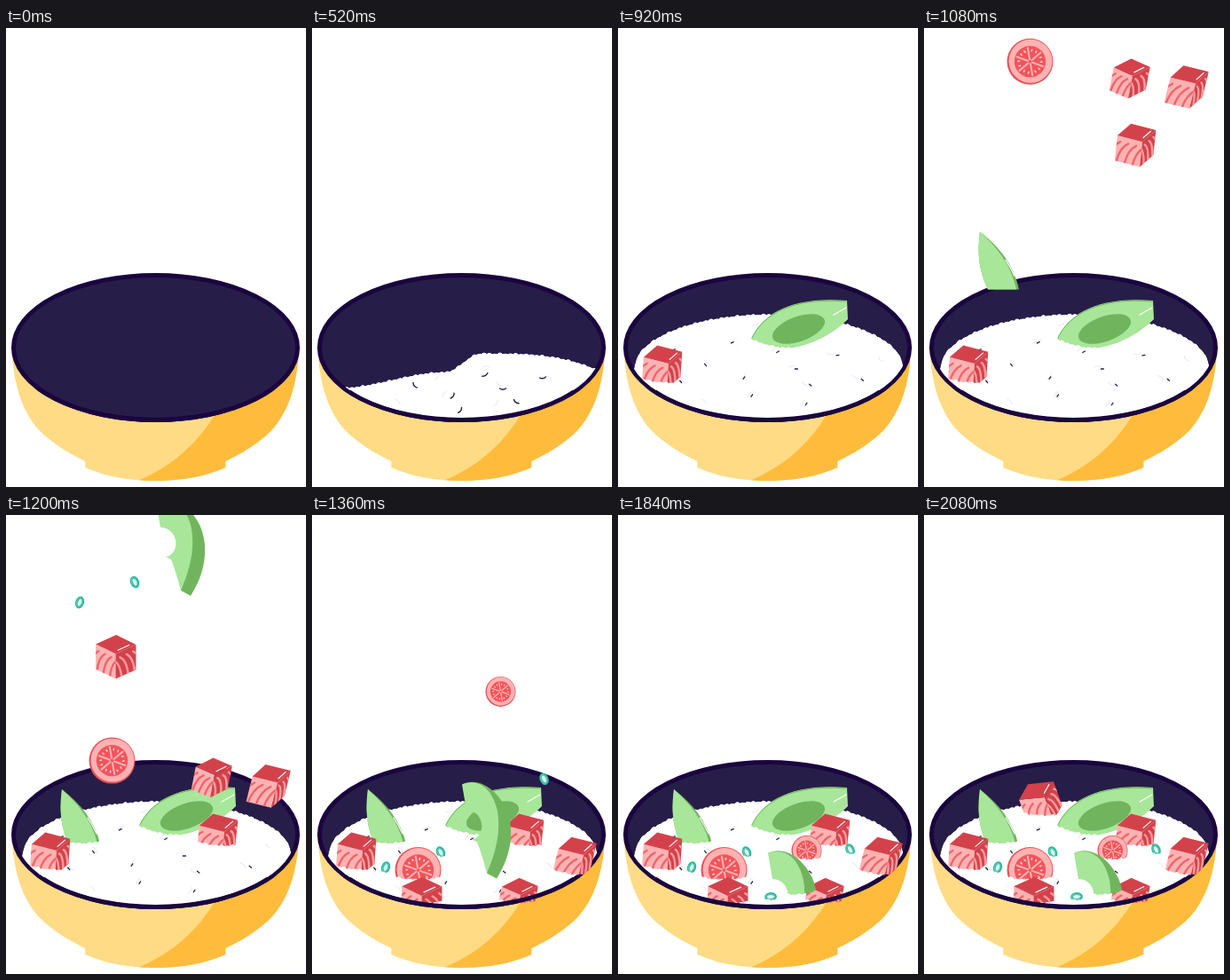
Animation, 338 px wide and 517 px high, one loop 4520 ms. Source, as an HTML page with a canvas:

```html
<!DOCTYPE html>
<html lang="en">
<head>
<meta charset="utf-8">
<title>Rice bowl</title>
<style>
html, body { margin: 0; width: 100%; height: 100%; overflow: hidden; background: #fff; }
canvas { display: block; width: 338px; height: 517px; }
</style>
</head>
<body>
<canvas id="stage" width="338" height="517"></canvas>
<script>
const ctx = document.getElementById('stage').getContext('2d');
const LOOP = 4520, TICK = 40, SPEED = 1.99;
const INK = '#1a053f', INSIDE = '#271d49';
const RED = '#d3424b', ROSE = '#ffb2b2', CORAL = '#f0656d', TOMATO = '#f4535b';
const GREEN = '#a8e699', LEAF = '#70b55d', TEAL = '#2db79c';

const mix = (a, b, p) => a + (b - a) * p;
const ramp = (x, a, b) => {
  const p = Math.min(1, Math.max(0, (x - a) / (b - a)));
  return p * p * (3 - 2 * p);
};

function fill(path, color) {
  ctx.fillStyle = color;
  ctx.fill(path);
}

function stroke(path, color, width) {
  ctx.strokeStyle = color;
  ctx.lineWidth = width;
  ctx.stroke(path);
}

const shape = (d, color) => fill(new Path2D(d), color);
const line = (d, color, width) => stroke(new Path2D(d), color, width);

function poly(...points) {
  const p = new Path2D();
  points.forEach(([x, y]) => p.lineTo(x, y));
  p.closePath();
  return p;
}

function oval(x, y, rx, ry, turn = 0) {
  const p = new Path2D();
  p.ellipse(x, y, rx, ry, turn, 0, Math.PI * 2);
  return p;
}

function inside(path, draw) {
  ctx.save();
  ctx.clip(path);
  draw();
  ctx.restore();
}

function placed(x, y, turn, draw) {
  ctx.save();
  ctx.translate(x, y);
  ctx.rotate(turn);
  draw();
  ctx.restore();
}

// Continues a path along a height function with small rice-like bumps.
function bumps(path, height, from, to) {
  const n = Math.round((to - from) / 6), step = (to - from) / n;
  path.lineTo(from, height(from));
  for (let i = 0; i < n; i++) {
    const x = from + i * step, m = x + step / 2;
    path.quadraticCurveTo(m, height(m) - 2.2 - 1.2 * Math.sin(i * 2.4), x + step, height(x + step));
  }
}

// Bowl
const rim = oval(168.5, 360, 160, 81.5);
const hollow = oval(168.5, 360, 158, 79.5);
const half = new Path2D('M0 0H-162C-160 42 -150 72 -131 93C-116 108 -98 119 -79 128V135C-57 145 -30 150 0 150Z');
const body = new Path2D();
for (const side of [1, -1]) body.addPath(half, new DOMMatrix([side, 0, 0, 1, 168.3, 360]));

function drawBowl() {
  fill(body, '#ffdb85');
  inside(body, () => shape('M236 434C216 468 186 495 146 511H338V350Z', '#ffbc3c'));
  fill(rim, INSIDE);
  stroke(rim, INK, 5);
}

function drawFrontRim() {
  const front = new Path2D();
  front.rect(0, 408, 338, 60);
  inside(front, () => stroke(rim, INK, 5));
}

// Rice
const BASE = 446;
const slope = x => 406 - 18 * ramp(x, 30, 150) - 21 * ramp(x, 150, 190) + 18 * (Math.max(0, x - 195) / 125) ** 3;
const dome = x => 384 - 61 * Math.sqrt(Math.max(0, 1 - ((x - 170) / 152) ** 2));

function riceTop(stage) {
  return x => stage < 3
    ? mix(BASE, slope(x), (stage + 1) / 4)
    : mix(slope(x), dome(x), (stage - 3) / 3);
}

// Spreads n marks evenly over an oval.
function scatter(n, cx, cy, rx, ry, draw) {
  for (let i = 0; i < n; i++) {
    const r = Math.sqrt((i + 0.5) / n), a = i * 2.4;
    placed(cx + rx * r * Math.cos(a), cy + ry * r * Math.sin(a), Math.sin(i * 5), () => draw(i));
  }
}

function drawRice(t) {
  if (t < 280) return;
  const stage = Math.min(6, Math.floor((t - 280) / 80));
  const rice = new Path2D();
  rice.moveTo(18, 450);
  bumps(rice, riceTop(stage), 18, 322);
  rice.lineTo(322, 450);
  rice.closePath();
  inside(hollow, () => inside(rice, () => {
    fill(rice, '#fff');
    scatter(16, 172, 382, 138, 50, i => line(`M-4 0Q0 ${i % 2 ? 3 : -3} 4 0`, '#e9e8ee', 1));
    if (stage < 4) scatter(8, 190, 406, 100, 28, () => line('M-3.500 0Q0 2.500 3.500 0', INSIDE, 1.4));
    else scatter(13, 175, 384, 132, 44, () => line('M-1.500 0H1.500', INSIDE, 1.3));
  }));
}

// Toppings, drawn around their own origin
function stripes(edge, d, color) {
  const at = (u, v) => [edge[0] * u + d[0] * v, edge[1] * u + d[1] * v];
  inside(poly(at(0, 0), at(1, 0), at(1, 1), at(0, 1)), () => {
    for (let u = 0.3; u < 1.4; u += 0.32) {
      const p = new Path2D();
      p.moveTo(...at(u, 1.05));
      p.quadraticCurveTo(...at(u - 0.08, 0.45), ...at(u - 0.4, 0.22));
      stroke(p, color, 2.4);
    }
  });
}

// The origin is the near corner of the top face.
function cube(yaw, lean, turn = 0, size = 32) {
  const tilt = 0.47, c = size * Math.cos(yaw), s = size * Math.sin(yaw);
  const o = [0, 0], l = [-c, -s * tilt], r = [s, -c * tilt];
  const d = [lean, size * Math.sqrt(1 - tilt * tilt)];
  const add = (a, b) => [a[0] + b[0], a[1] + b[1]];
  return () => placed(0, 0, turn, () => {
    fill(poly(o, l, add(l, d), d), ROSE);
    stripes(l, d, CORAL);
    fill(poly(o, r, add(r, d), d), RED);
    stripes(r, d, '#ff9a9c');
    fill(poly(o, l, add(l, r), r), RED);
    line(`M${r[0] * 0.2 - 2} ${r[1] * 0.2 - 2}L${r[0] * 0.75 - 2} ${r[1] * 0.75 - 2}`, '#fff', 1.2);
  });
}

function tomato(r) {
  return () => {
    fill(oval(0, 0, r, r), '#e9525a');
    fill(oval(r * 0.02, -r * 0.02, r * 0.94, r * 0.94), ROSE);
    fill(oval(0, 0, r * 0.68, r * 0.68), TOMATO);
    for (let i = 0; i < 6; i++) {
      placed(0, 0, i * Math.PI / 3 + 0.35, () => {
        ctx.scale(r, r);
        line('M.1 0H.6', ROSE, 0.08);
        ctx.rotate(Math.PI / 6);
        for (const y of [-0.1, 0.1]) fill(oval(0.48, y, 0.065, 0.035), '#ffd0c4');
      });
    }
  };
}

function ring(turn) {
  return () => {
    const o = oval(0, 0, 3.5, 5.5, turn);
    fill(o, '#d9f7ef');
    stroke(o, TEAL, 2.9);
    stroke(oval(-0.4, 0, 3, 5, turn), '#7fdfc9', 0.7);
  };
}

function halfAvocado() {
  shape('M-45 10C-33 -18 1 -38 63 -33L64 -12C46 6 20 19 -5 21C-25 23 -37 19 -45 10Z', GREEN);
  line('M-44 9C-32 -17 1 -37 62 -32', LEAF, 1);
  fill(oval(8.5, -1, 31, 14, -0.34), LEAF);
  line('M48 -17L62 -25', '#fff', 1.2);
}

function sideWedge() {
  shape('M-22 -31C0 -14 16 6 22 34H-13C-24 12 -25 -10 -22 -31Z', LEAF);
  shape('M-22 -31C-3 -14 13 6 19 34H-13C-24 12 -25 -10 -22 -31Z', GREEN);
  line('M7 1Q13 10 17 19', '#fff', 1.2);
}

function frontWedge() {
  shape('M-26 -29C-5 -39 16 -19 24 -1C33 20 31 49 13 77L2 71L10 -10Z', LEAF);
  shape('M-26 -29C-8 -36 8 -25 14 1C18 25 12 48 2 71C-2 56 -5 46 -9 36L-15 33C1 31 1 1 -21 0Z', GREEN);
}

// Back to front: landing time, resting place, depth of the rice line, drawing.
const toppings = [
  [918, 195, 340, 21, halfAvocado],
  [2045, 136, 318, 21, cube(0.5, 0, -0.35)],
  [1120, 85, 340, 30, sideWedge],
  [920, 57, 378, 22, cube(0.5, -2)],
  [1195, 246, 357, 16, cube(0.5, -3)],
  [1241, 306, 383, 23, cube(0.48, -7)],
  [1262, 119.5, 400, 11, tomato(26)],
  [1450, 212.5, 378, 10, tomato(17)],
  [1350, 83, 397, 6, ring(0.3)],
  [1353, 145, 380, 5, ring(-0.4)],
  [1400, 261.5, 377, 5, ring(-0.4)],
  [1720, 172, 430, 4, ring(1.5)],
  [1337, 123.5, 429, 9, cube(0.8, 0)],
  [1268, 235, 428, 9, cube(0.75, -5, 0, 29)],
  [1399, 195, 410, 18, frontWedge]
].map(([land, x, y, depth, draw]) => {
  const above = new Path2D('M338 -99H0');
  const level = px => y + depth - (px - x) ** 2 / 200;
  above.lineTo(0, level(x - 60));
  bumps(above, level, x - 60, x + 60);
  above.lineTo(400, level(x + 60));
  above.lineTo(400, -99);
  above.closePath();
  return { land, x, y, draw, above };
});

function drawTopping({ land, x, y, draw, above }, t) {
  const drop = Math.max(0, (land - t) * SPEED);
  if (drop < 480) inside(above, () => placed(x, y - drop, 0, draw));
}

function render(ms) {
  const t = Math.floor(ms % LOOP / TICK) * TICK;
  ctx.fillStyle = '#fff';
  ctx.fillRect(0, 0, 338, 517);
  ctx.lineCap = 'round';
  drawBowl();
  drawRice(t);
  toppings.forEach(item => drawTopping(item, t));
  drawFrontRim();
}

let start;
function tick(now) {
  start ??= now;
  render(now - start);
  requestAnimationFrame(tick);
}
requestAnimationFrame(tick);
</script>
</body>
</html>
```
